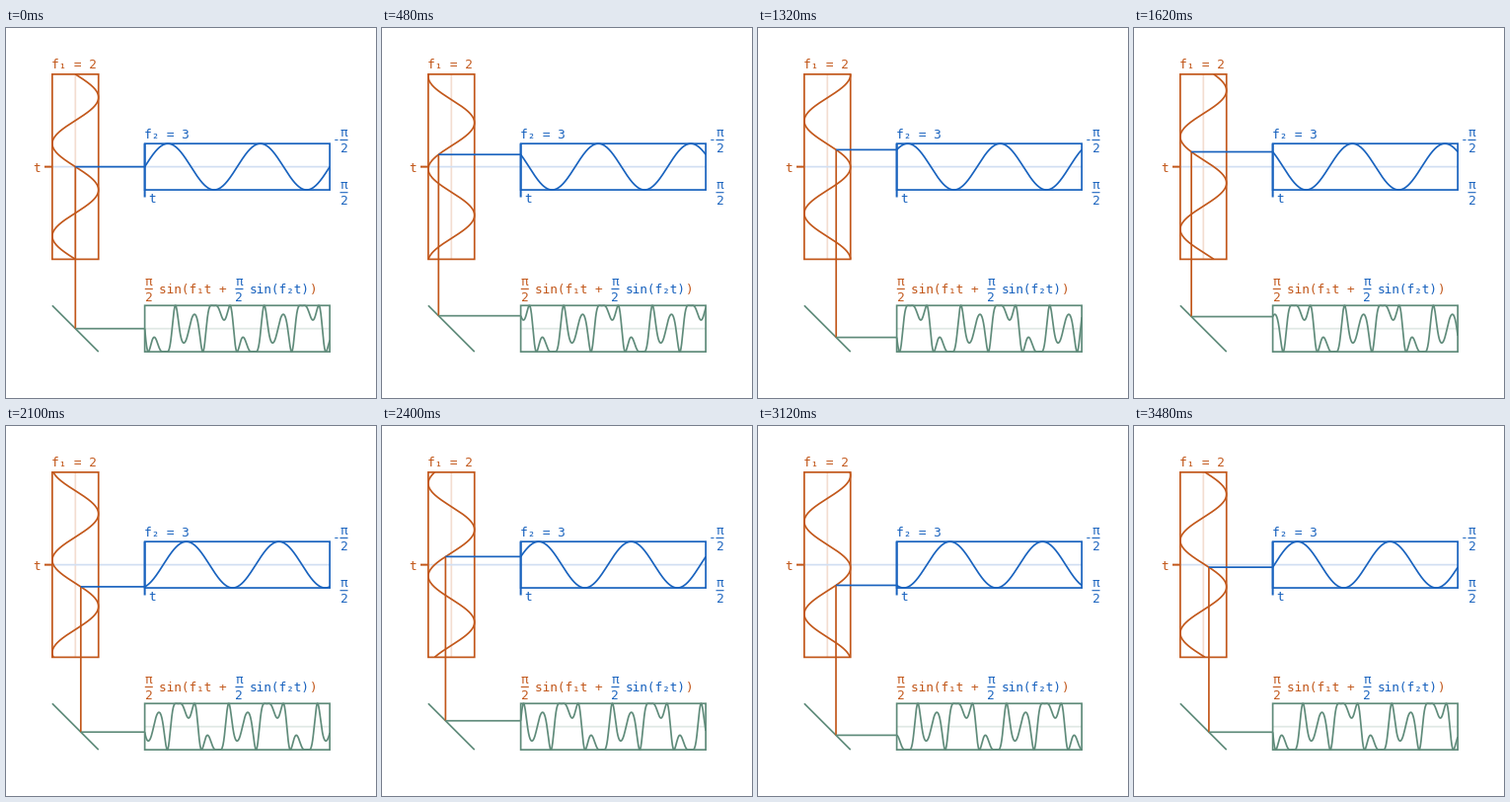
A matplotlib script that plays this animation: 375 px wide and 375 px high, repeating every 3540 ms.

```python
import numpy as np
import matplotlib.pyplot as plt
from matplotlib.animation import FuncAnimation

SIZE, DPI = 375, 100
U = SIZE / 16            # pixels per pi/2
CYCLE = 3500             # ms for one full turn of the phase
STEP, FRAMES = 60, 59
F1, F2 = 2, 3
TRAIL = 90 / (2 * np.pi)  # pixels per radian in the output trace

ORANGE, BLUE, GREEN = "#c2571a", "#1862be", "#5f8b7a"
PALE_ORANGE, PALE_BLUE, PALE_GREEN = "#f3ddd1", "#d1dff2", "#dfe8e4"

X1, Y1 = 3 * U, 6 * U    # centre of the vertical wave
X2 = 6 * U               # left edge of the horizontal plots
X3 = 14 * U              # right edge of the horizontal plots
Y3 = 13 * U              # centre of the output plot

plt.rcParams["path.snap"] = False
plt.rcParams["font.family"] = "DejaVu Sans Mono"
PX = 72 / DPI
FONT = 12.8
ADVANCE = FONT * 0.602

fig = plt.figure(figsize=(SIZE / DPI, SIZE / DPI), dpi=DPI, facecolor="white")
ax = fig.add_axes([0, 0, 1, 1])
ax.set_xlim(0, SIZE)
ax.set_ylim(SIZE, 0)
ax.axis("off")


def line(xs, ys, color, width=1.7, z=2, cap="butt"):
    return ax.plot(xs, ys, color=color, lw=width * PX, zorder=z,
                   solid_capstyle=cap, solid_joinstyle="miter")[0]


def box(x0, y0, x1, y1, color):
    ax.add_patch(plt.Rectangle((x0, y0), x1 - x0, y1 - y0, fill=False,
                               ec=color, lw=1.7 * PX, zorder=3))


def label(x, y, text, color):
    ax.text(x, y, text, color=color, fontsize=FONT * PX,
            ha="left", va="baseline", zorder=5)


def half_pi(x, y, color):
    """Stacked fraction with its bar at height y."""
    label(x, y - 3.7, "π", color)
    line([x, x + 8], [y, y], color, 1.1, 5)
    label(x, y + 12.2, "2", color)


# Centre lines
line([X1, X1], [2 * U, 10 * U], PALE_ORANGE, z=1)
line([2 * U, X3], [Y1, Y1], PALE_BLUE, z=1)
line([X2, X3], [Y3, Y3], PALE_GREEN, z=1)

# Frames, ticks and mirror
box(2 * U, 2 * U, 4 * U, 10 * U, ORANGE)
box(X2, 5 * U, X3, 7 * U, BLUE)
box(X2, 12 * U, X3, 14 * U, GREEN)
line([39, 2 * U], [Y1, Y1], ORANGE, 2)
line([X2, X2], [5 * U, 171.5], BLUE, 2, 4)
line([2 * U, 4 * U], [12 * U, 14 * U], GREEN)

# Lettering
label(46, 41, "f₁ = 2", ORANGE)
label(140, 111.5, "f₂ = 3", BLUE)
label(27.5, 145.5, "t", ORANGE)
label(144.5, 177, "t", BLUE)
label(331, 117.2, "-", BLUE)
half_pi(338.5, 113.5, BLUE)
half_pi(338.5, 166.7, BLUE)
half_pi(140.8, 264.5, ORANGE)
label(155.4, 269, "sin(f₁t +", ORANGE)
half_pi(155.4 + 10 * ADVANCE, 264.5, BLUE)
label(246.5, 269, "sin(f₂t)", BLUE)
label(246.5 + 8 * ADVANCE, 269, ")", ORANGE)

# Moving parts
span = np.linspace(0, 8 * U, 500)
ys1 = 2 * U + span
xs2 = X2 + span
wave1 = line([], [], ORANGE)
wave2 = line([], [], BLUE)
wave3 = line([], [], GREEN)
beam1 = line([], [], ORANGE, z=4)
beam2 = line([], [], BLUE, z=4)
beam3 = line([], [], GREEN, z=4)


def output(t):
    return np.sin(F1 * t + np.pi / 2 * np.sin(F2 * t))


def update(i):
    t = 2 * np.pi * i * STEP / CYCLE
    quarter = np.pi / 2 / U
    wave1.set_data(X1 + U * np.sin((ys1 - Y1) * quarter - F1 * t), ys1)
    wave2.set_data(xs2, Y1 - U * np.sin(span * quarter + F2 * t))
    wave3.set_data(xs2, Y3 - U * output(t - span / TRAIL))

    y_in = Y1 - U * np.sin(F2 * t)
    shift = -U * output(t)
    x_hit, y_out = X1 + shift, Y3 + shift
    beam2.set_data([x_hit, X2], [y_in, y_in])
    beam1.set_data([x_hit, x_hit], [y_in, y_out])
    beam3.set_data([x_hit, X2], [y_out, y_out])
    return wave1, wave2, wave3, beam1, beam2, beam3


anim = FuncAnimation(fig, update, frames=FRAMES, interval=STEP,
                     repeat=True, repeat_delay=0, blit=False)
plt.show()
```
